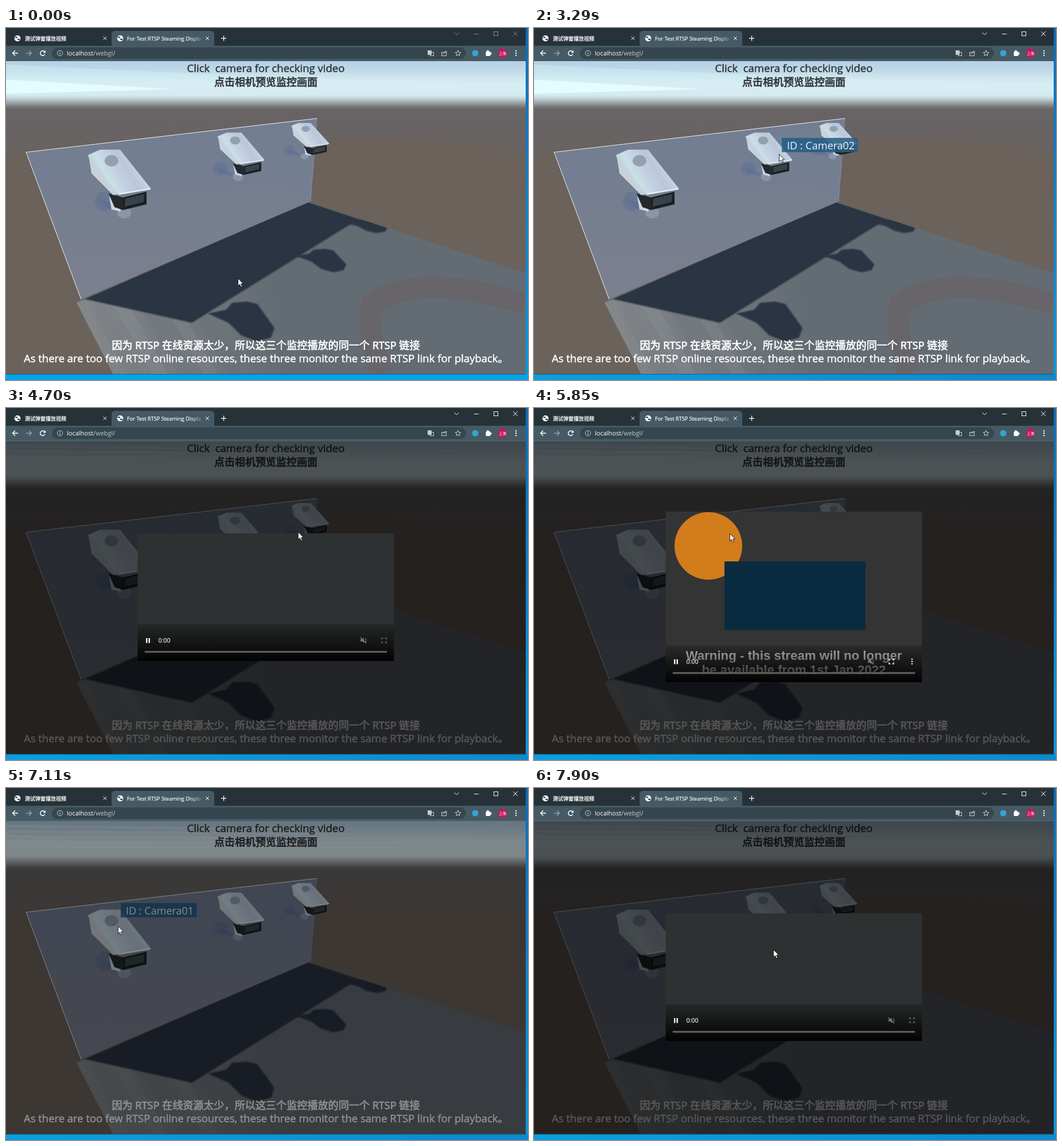
Write an HTML page with a canvas that moves like this. It is 910 px wide and 615 px high and loops after 8 s.

```html
<!DOCTYPE html>
<html lang="zh-CN">
<head>
<meta charset="utf-8">
<title>Camera preview</title>
<style>
html, body { margin: 0; width: 100%; height: 100%; overflow: hidden; background: #263238; }
canvas { display: block; width: 910px; height: 615px; }
</style>
</head>
<body>
<canvas id="stage" width="910" height="615"></canvas>
<script>
const W = 910, H = 615, LOOP = 8000, STEP = 130;
const PAGE = { x: 0, y: 58, w: 906, h: 547 };
const SANS = '"Open Sans", "Noto Sans CJK SC", "Noto Sans CJK", sans-serif';
const ARIAL = '"Liberation Sans", Arial, sans-serif';
const SHADOW = '#2b3442', WHITE = '#fff';
const OPEN = 4280, PLAY = 5430, CLOSE = 6840, REOPEN = 7620;
const view = document.getElementById('stage').getContext('2d');
let g = view;

// Drawing helpers
const layer = (paint) => {
  const c = document.createElement('canvas');
  c.width = W; c.height = H;
  g = c.getContext('2d');
  paint();
  g = view;
  return c;
};
const trace = (pts, close) => {
  g.beginPath();
  for (const [x, y] of pts) g.lineTo(x, y);
  if (close) g.closePath();
};
const poly = (pts, fill) => { trace(pts, true); g.fillStyle = fill; g.fill(); };
const line = (pts, color, width = 1) => {
  trace(pts); g.strokeStyle = color; g.lineWidth = width; g.stroke();
};
const add = (...v) => v.reduce((a, b) => [a[0] + b[0], a[1] + b[1]]);
const face = (o, u, v, fill) => poly([o, add(o, u), add(o, u, v), add(o, v)], fill);
const rect = (x, y, w, h, fill) => { g.fillStyle = fill; g.fillRect(x, y, w, h); };
const round = (x, y, w, h, r, fill) => {
  g.beginPath(); g.roundRect(x, y, w, h, r); g.fillStyle = fill; g.fill();
};
const oval = (x, y, rx, ry, fill) => {
  g.beginPath(); g.ellipse(x, y, rx, ry, 0, 0, 7); g.fillStyle = fill; g.fill();
};
const ring = (x, y, r, color, width = 1, from = 0, to = 7) => {
  g.beginPath(); g.arc(x, y, r, from, to); g.strokeStyle = color; g.lineWidth = width; g.stroke();
};
const ramp = (x0, y0, x1, y1, ...colors) => {
  const r = g.createLinearGradient(x0, y0, x1, y1);
  colors.forEach((c, i) => r.addColorStop(i / (colors.length - 1), c));
  return r;
};
const text = (s, x, y, size, color, align = 'left', heavy = 0, font = SANS) => {
  g.font = size + 'px ' + font;
  g.textAlign = align;
  g.fillStyle = g.strokeStyle = color;
  g.fillText(s, x, y);
  g.lineWidth = heavy;
  if (heavy) g.strokeText(s, x, y);
};
const clamp = (v) => Math.max(0, Math.min(1, v));
const smooth = (v) => { v = clamp(v); return v * v * (3 - 2 * v); };
const mix = (a, b, k) => a.map((v, i) => v + (b[i] - v) * k);

// Three equal cameras recede along the wall.
const cameras = [0, 1, 2].map((i) => {
  const k = 1 - .57 ** i;
  return { k, x: 142 + 526 * k, y: 211 - 68 * k, sx: 1 - .593 * k, sy: 1 - .698 * k };
});

function sky(streaky) {
  const top = [184, 211, 229], pale = streaky ? [214, 235, 240] : [224, 242, 246];
  for (let y = 58; y < 150; y += 2) {
    const base = mix(top, pale, smooth((y - 60) / 38));
    rect(0, y, PAGE.w, 2, `rgb(${mix(base, [104, 99, 100], smooth((y - 114) / 30))})`);
  }
  if (streaky) {
    poly([[0, 64], [420, 84], [906, 96], [906, 112], [0, 100]], '#d2eff866');
    poly([[0, 90], [296, 107], [0, 115]], '#e2fcff');
  } else {
    for (let i = 0; i < 5; i++) poly([[0, 64 + i * 9], [906, 76 + i * 7], [0, 69 + i * 9]], '#ecfaff55');
  }
}

function ground() {
  rect(0, 144, PAGE.w, 461, ramp(0, 144, 0, 210, '#686465', '#696362'));
  g.beginPath();
  g.moveTo(0, 213);
  g.bezierCurveTo(320, 182, 640, 182, 906, 213);
  g.lineTo(906, 605); g.lineTo(0, 605);
  g.fillStyle = '#6a625b';
  g.fill();
}

function floor(withArch) {
  const edge = [[123, 480], [526, 304], [906, 428], [906, 605], [187, 605]];
  poly(edge, ramp(130, 500, 470, 440, '#85888b', '#767c81', '#6d747a', '#636b73'));
  g.save();
  trace(edge, true);
  g.clip();
  for (let i = 0; i < 5; i++) face([136 + i * 44, 470], [26, 0], [76, 135], i % 2 ? '#ffffff0c' : '#5d626a18');
  if (withArch) {
    g.beginPath();
    g.moveTo(655, 605);
    g.quadraticCurveTo(626, 520, 638, 482);
    g.quadraticCurveTo(720, 425, 906, 482);
    g.strokeStyle = '#68656a'; g.lineWidth = 38; g.stroke();
  }
  g.filter = 'blur(1.2px)';
  poly([[135, 473], [526, 304], [664, 350], [605, 340], [324, 515]], SHADOW);
  for (const { k } of cameras) {
    g.save();
    g.translate(352 + 354 * k, 478 - 214 * k);
    g.scale(1 - .54 * k, 1 - .96 * k);
    poly([[0, 21], [32, 14], [42, 2], [68, 0], [86, 4], [116, 46], [110, 63], [86, 70], [58, 59], [36, 37]], SHADOW);
    g.restore();
  }
  g.restore();
}

function wall() {
  const [a, b, c, d] = [[35, 217], [542, 158], [531, 303], [131, 474]];
  poly([a, b, c, d], ramp(0, 170, 0, 470, '#737e92', '#757e90', '#788091'));
  poly([[68, 305], [330, 290], [470, 272], c, d], '#7f7f8a38');
  line([b, c], '#9aa2b088');
  line([d, a, b], '#eef0f2');
}

function camera({ k, x, y, sx, sy }) {
  const back = [2, 12], across = [54, -9], along = [53, 67], front = [62, 85];
  const shift = -52 * k;
  g.save();
  g.translate(x, y);
  g.scale(sx, sy);
  g.lineJoin = 'round';
  oval(30 + shift, 92, 17, 17, '#5a6d9277');
  face([22 + shift, 88], [36, 14], [4, 12], '#536c9d77');
  oval(64 + shift * .7, 112, 12, 10, '#94a8bc99');
  face([38, 84], [16, 4], [4, 22], '#cbd8e2');
  poly([[37, 78], front, [62, 107], [47, 102]], '#24282c');
  face(front, [41, -10], [0, 22], '#1b1f22');
  face(add(front, [4, 2]), [33, -8], [-1, 14], '#37434a');
  poly([back, add(back, along), [45, 81], [7, 43]], '#c9d2da');
  const shade = ramp(20, 60, 82, 22, '#b9c6d0', '#c8e0e8', '#c4d0e2', '#b8c7d9', '#c6d6e4');
  face(back, across, along, shade);
  trace([back, add(back, [20, -9]), add(back, across), add(back, across, along), add(back, along)], true);
  g.fill(); g.strokeStyle = shade; g.lineWidth = 3; g.stroke();
  line([add(back, along), add(back, along, across)], '#eaf2f6', 2);
  oval(42, 21, 12, 10, '#93a1ae');
  g.restore();
}

function captions() {
  const ink = '#323639';
  text('Click  camera for checking video', 453, 77, 18.5, ink, 'center', .5);
  text('点击相机预览监控画面', 453, 101, 18, ink, 'center', .8);
  text('因为 RTSP 在线资源太少，所以这三个监控播放的同一个 RTSP 链接', 453, 560.5, 18.1, WHITE, 'center', .7);
  text('As there are too few RTSP online resources, these three monitor the same RTSP link for playback。',
    31, 584, 18.48, WHITE, 'left', .5);
}

const land = (withArch) => layer(() => {
  ground(); floor(withArch); wall();
  cameras.forEach(camera);
  captions();
});

// Browser window
const cross = (x, y, r, color) => {
  for (const s of [-1, 1]) line([[x - r, y - r * s], [x + r, y + r * s]], color);
};
const dots = (x, y, color) => {
  for (let i = -1; i < 2; i++) oval(x, y + i * 4, 1.2, 1.2, color);
};
const globe = (x, y) => {
  oval(x, y, 5.3, 5.3, WHITE);
  for (const s of [-1, 1]) oval(x + s * 2, y + s * 1.8, 2.4, 1.3, '#33444c');
};
const arrowIcon = (x, dir, color) => {
  line([[x + 5 * dir, 44], [x - 4 * dir, 44]], color, 1.5);
  line([[x, 39.5], [x - 4.5 * dir, 44], [x, 48.5]], color, 1.5);
};
const star = (x, y, color) => line(Array.from({ length: 11 }, (_, i) => {
  const a = i * Math.PI / 5 - Math.PI / 2, r = i % 2 ? 2.2 : 5.2;
  return [x + r * Math.cos(a), y + r * Math.sin(a)];
}), color);

function chrome() {
  const icon = '#c3ccd0';
  rect(0, 0, 906, 31, '#263238');
  round(184, 5, 179, 30, 6, '#455a64');
  rect(0, 31, 906, 27, '#455a64');
  globe(20, 18); globe(199, 18);
  text('测试弹窗播放视频', 33, 21.5, 9, '#f4f6f7', 'left', .3);
  text('For Test RTSP Steaming Displa', 211, 21.5, 9.2, ramp(318, 0, 341, 0, '#ffffff', '#ffffff30'), 'left', .2);
  cross(172.5, 18, 2.8, WHITE); cross(351, 18, 2.8, WHITE);
  rect(375, 17.4, 9, 1.3, WHITE); rect(378.9, 13.5, 1.3, 9, WHITE);

  round(80, 34, 722, 20, 10, '#35464e');
  arrowIcon(16, 1, WHITE); arrowIcon(40, -1, '#93a0a6');
  ring(64, 44, 4.2, WHITE, 1.5, .5, 5.6);
  poly([[69, 39], [69, 43.5], [64.5, 43.5]], WHITE);
  ring(94, 44, 4.6, icon);
  rect(93.5, 43, 1.1, 4, icon); rect(93.5, 41, 1.1, 1.1, icon);
  text('localhost', 106, 48, 11, WHITE);
  text('/webgl/', 106 + g.measureText('localhost').width, 48, 11, '#c2cbcf');

  round(735, 39, 7, 8, 1, icon);
  g.lineWidth = 1; g.strokeStyle = icon;
  g.strokeRect(739.5, 42.5, 6, 6);
  g.strokeRect(759.5, 42.5, 8, 6);
  line([[762, 46], [764, 42], [769, 41]], icon);
  star(788, 44.3, icon);
  oval(818, 44, 5.5, 5.5, '#36a3d0');
  round(836.5, 41, 8, 8, 1, WHITE);
  oval(840, 40.5, 1.8, 1.8, WHITE); oval(845, 44.5, 1.8, 1.8, WHITE);
  oval(865.5, 44, 8, 8, '#c2185b');
  text('上海', 865.5, 46.5, 6.5, WHITE, 'center');
  dots(889, 44, WHITE);
  rect(0, 57, 906, 1, '#526873');
}

function desktop(active) {
  rect(906, 0, 4, H, ramp(0, 0, 0, H, '#0c6cb8', '#0f82cc', '#0a98de'));
  rect(0, 605, W, 10, active ? ramp(0, 0, W, 0, '#0a9fe3', '#0b8ad2') : '#02a6ec');
  rect(0, 604.5, 906, 1, '#2f5468');
}

function windowButtons(active) {
  const c = active ? '#f4f6f7' : '#7e898e';
  line([[781.5, 8], [785.5, 12], [789.5, 8]], c);
  rect(816, 10, 8, 1, c);
  g.strokeRect(850.5, 6.5, 7, 7);
  cross(888, 10, 4, c);
}

const glides = [
  { from: 280, to: 430, end: [411, 417] },
  { from: 710, to: 1640, end: [251, 272] },
  { from: 1760, to: 2060, end: [207, 265] },
  { from: 2330, to: 3290, end: [427, 220] },
  { from: 3430, to: 4000, end: [540, 196] },
  { from: 4430, to: 5310, end: [457, 250] },
  { from: PLAY, to: 6430, end: [196, 180] },
  { from: 6570, to: 7110, end: [195, 241] },
  { from: 7240, to: 7380, end: [194, 249] },
  { from: REOPEN, to: 7900, end: [417, 282] }
];
function pointer(t) {
  let p = [404, 437];
  for (const { from, to, end } of glides) {
    if (t < from) break;
    const gaps = Math.round((to - from) / STEP);
    const step = Math.floor((t - from) * gaps / (to - from) + 1e-6) + 1;
    p = mix(p, end, clamp(step / (gaps + 1)));
  }
  return p;
}

// Overlay state
const stepsSince = (t, start) => Math.floor((t - start) / STEP);
const gone = (t) => t < OPEN || (t >= CLOSE + STEP && t < REOPEN);
const openedAt = (t) => t < REOPEN ? OPEN : REOPEN;
function dimAt(t) {
  if (t < OPEN) return 0;
  const k = gone(t) ? 1 - stepsSince(t, CLOSE + STEP) / 3 : stepsSince(t, openedAt(t)) / 2;
  return .66 * clamp(k);
}
function dialogAlpha(t) {
  if (gone(t)) return 0;
  return t >= CLOSE && t < REOPEN ? .5 : 1;
}

function tooltip([px, py]) {
  const i = cameras.findIndex(({ x, y, sx, sy }) =>
    px >= x && px <= x + 110 * sx && py >= y && py <= y + 107 * sy);
  if (i < 0) return;
  const left = Math.round(px) + 5, top = Math.round(py) - 28;
  rect(left, top, 132.5, 25, '#245d86d9');
  text('ID : Camera0' + (i + 1), left + 9, top + 20, 18, '#eef4f8');
}

function controls(x, bottom, mode) {
  const y = bottom - 36, on = mode === 'idle' ? '#808080' : WHITE, off = '#707070';
  if (mode === 'idle') poly([[x + 15, y - 4], [x + 22, y], [x + 15, y + 4]], on);
  else for (const dx of [14.5, 19]) rect(x + dx, y - 4, 2.4, 8.5, on);
  text('0:00', x + 36, y + 4, 11, WHITE, 'left', 0, 'Roboto, sans-serif');

  const vol = x + (mode === 'load' ? 393.5 : 357.5), full = vol + 36;
  rect(vol - 5, y - 2, 3, 4, off);
  poly([[vol - 3, y], [vol + 1, y - 5], [vol + 1, y + 5]], off);
  ring(vol + 1, y, 4, off, 1.2, -1.1, 1.1);
  line([[vol - 5, y - 5], [vol + 5, y + 5]], '#8a8a8a', 1.2);
  for (const a of [-4, 4]) for (const b of [-4, 4])
    line([[full + a, y + b * .4], [full + a, y + b], [full + a * .4, y + b]], mode === 'video' ? WHITE : off, 1.4);
  if (mode !== 'load') dots(full + 36, y, on);
  round(x + 12, bottom - 17.5, 423, 3, 1.5, '#636363');
}

function video() {
  oval(304, 241, 59, 59, '#d27c1c');
  rect(332, 268, 246, 120, '#0b2b40');
  g.filter = 'blur(.6px)';
  text('Warning - this stream will no longer', 453, 440, 'bold 22.3', '#e4e4e4', 'center', 0, ARIAL);
  text('be available from 1st Jan 2022', 453, 465, 'bold 22.3', '#f0f0f0', 'center', 0, ARIAL);
  g.filter = 'none';
}

function dialog(t) {
  const playing = t >= PLAY && t < REOPEN;
  const mode = playing ? 'video' : stepsSince(t, openedAt(t)) < 1 ? 'idle' : 'load';
  const x = mode === 'idle' ? 223 : 229.5;
  const top = playing ? 181 : 219, bottom = 660 - top + (playing ? 0 : 1);
  rect(x, top, 447, bottom - top, { video: '#343434', idle: '#303030', load: '#2e3131' }[mode]);
  if (playing) video();
  rect(x, bottom - 64, 447, 64, ramp(0, bottom - 64, 0, bottom, '#00000030', '#000000f2'));
  controls(x, bottom, mode);
}

function arrow(x, y) {
  g.save();
  g.translate(x + .5, y + .5);
  poly([[0, 0], [0, 13], [3, 10.3], [5, 15], [7.2, 14], [5.2, 9.5], [9, 9.3]], WHITE);
  g.strokeStyle = '#111'; g.lineWidth = .9; g.stroke();
  g.restore();
}

const streakySky = layer(() => sky(true)), softSky = layer(() => sky(false));
const archLand = land(true), plainLand = land(false), frame = layer(chrome);

function draw(t) {
  const dim = dimAt(t), alpha = dialogAlpha(t), p = pointer(t), active = t >= 710;
  g.drawImage(t < OPEN ? streakySky : softSky, 0, 0);
  g.drawImage(dim || alpha ? plainLand : archLand, 0, 0);
  // Under the fading overlay the label trails the pointer by one step.
  if (!alpha || !dim) tooltip(dim ? pointer(t - STEP) : p);
  rect(PAGE.x, PAGE.y, PAGE.w, PAGE.h, `rgba(0,0,0,${dim})`);
  g.drawImage(frame, 0, 0);
  desktop(active);
  windowButtons(active);
  g.globalAlpha = alpha;
  if (alpha) dialog(t);
  g.globalAlpha = 1;
  arrow(...p);
}

const start = performance.now();
function tick() {
  draw((performance.now() - start) % LOOP);
  requestAnimationFrame(tick);
}
tick();
</script>
</body>
</html>
```
